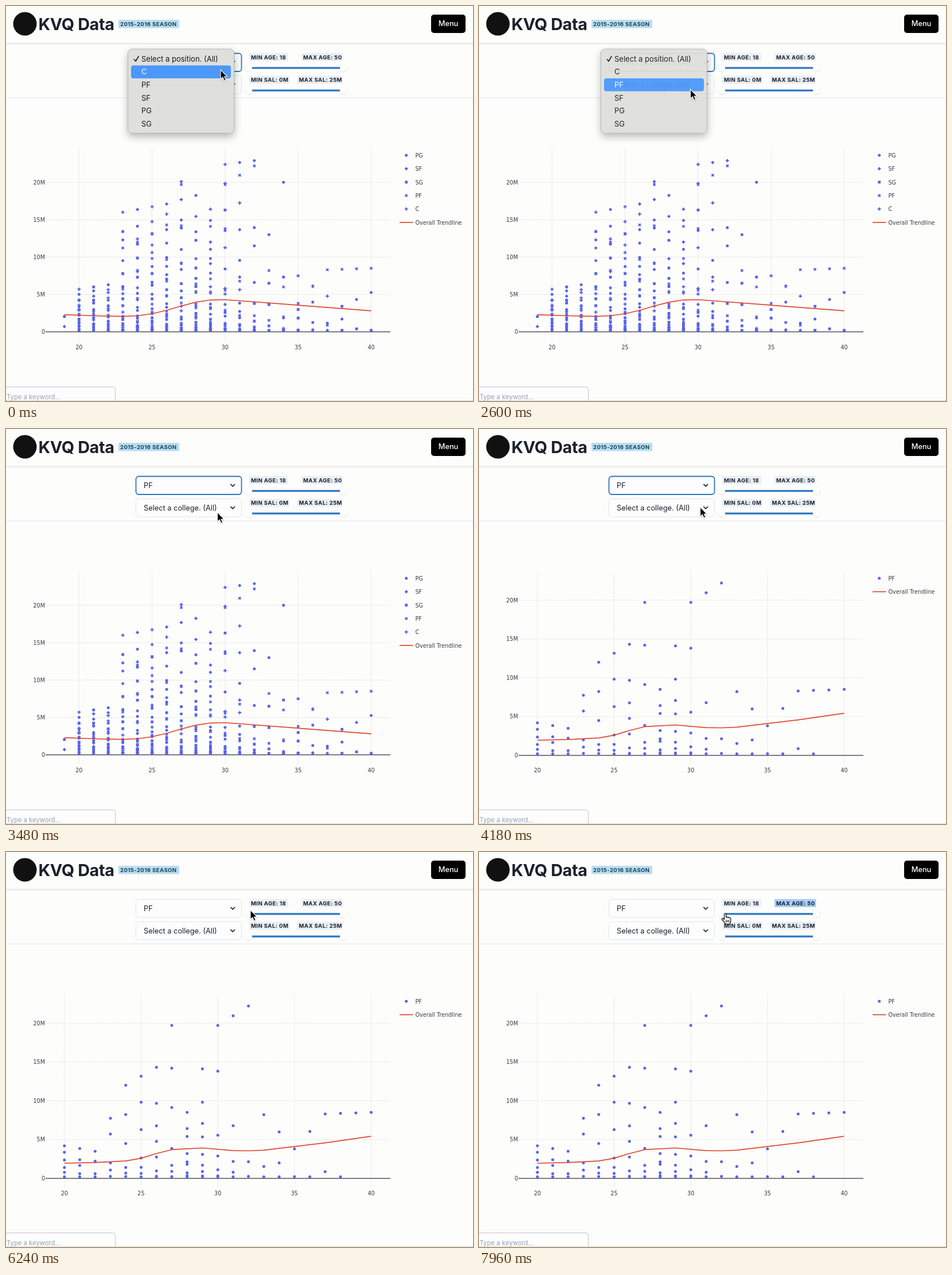
Write an HTML page that moves like this. It is 814 px wide and 688 px high and loops after 8000 ms.

```html
<!DOCTYPE html>
<html lang="en">
<head>
<meta charset="utf-8">
<title>Season salaries</title>
<style>
  html, body { margin: 0; width: 100%; height: 100%; overflow: hidden; background: #fdfdfc; }
  svg { display: block; width: 814px; height: 688px; font: 12.8px Inter, sans-serif; fill: #1a202c; }
  .badge { font-size: 9.6px; font-weight: 700; letter-spacing: .4px; }
  .chart { font: 9.6px "DejaVu Sans", sans-serif; fill: #363a42; }
  .mark { fill: #5663ec; }
  .trend { fill: none; stroke: #df452e; stroke-width: 1.7; stroke-linejoin: round; }
  .grid { stroke: #e5e5ea; stroke-width: 1; stroke-dasharray: 2 .6; }
  .chevron { fill: none; stroke: #1a202c; stroke-width: 1.7; stroke-linecap: round; stroke-linejoin: round; }
  .box { fill: #fdfdfd; stroke: #dfe4ed; }
  .box.focused { stroke: #2c76bf; stroke-width: 1.8; }
  .menu { font-size: 13px; }
</style>
</head>
<body>
<svg viewBox="0 0 814 688">
  <defs>
    <filter id="menuShadow" x="-20%" y="-20%" width="140%" height="150%">
      <feDropShadow dx="0" dy="6" stdDeviation="7" flood-opacity=".27"/>
    </filter>
    <filter id="thumbShadow" x="-50%" y="-50%" width="200%" height="200%">
      <feDropShadow dx="0" dy=".8" stdDeviation="1" flood-opacity=".16"/>
    </filter>
    <filter id="cursorShadow" x="-50%" y="-50%" width="200%" height="200%">
      <feDropShadow dx="0" dy="1" stdDeviation="1" flood-opacity=".3"/>
    </filter>
  </defs>

  <circle cx="33" cy="31" r="20.5" fill="#111"/>
  <text x="188.5" y="42" text-anchor="end" font-size="28.8" font-weight="700" letter-spacing="-.4">KVQ Data</text>
  <rect x="196" y="24" width="106" height="14.5" rx="1.5" fill="#b9def0"/>
  <text x="199" y="34.8" class="badge" fill="#1d4059">2015-2016 SEASON</text>
  <rect x="741" y="15" width="60" height="32" rx="5" fill="#000"/>
  <text x="771" y="35.4" text-anchor="middle" fill="#fff" font-weight="500">Menu</text>
  <path d="M0 65.5H814" stroke="#e5e5e9" stroke-width="2"/>
  <path d="M0 160H814" stroke="#dfe5f1"/>

  <rect id="positionBox" class="box" x="226.5" y="82.5" width="184" height="31.5" rx="5"/>
  <text id="positionText" x="240" y="102.5"></text>
  <rect class="box" x="226.5" y="121.5" width="184" height="31.5" rx="5"/>
  <text x="240" y="141.5">Select a college. (All)</text>
  <path class="chevron" d="M391.8 96.5l3.4 3.4 3.4-3.4M391.8 135.5l3.4 3.4 3.4-3.4"/>
  <g id="sliders"></g>

  <g id="allChart"></g>
  <g id="forwardChart"></g>

  <rect x="-4" y="663.5" width="194.5" height="40" rx="4" fill="#fdfdfd" stroke="#bfc4d4"/>
  <text x="1" y="685" font-size="11.2" letter-spacing=".05" fill="#99a0b3">Type a keyword...</text>
  <path d="M0 687.5H814" stroke="#d5d6dc"/>

  <g id="menu" class="menu"></g>

  <path id="arrow" filter="url(#cursorShadow)" stroke="#fff" stroke-width="1.1"
    d="M0 0V16.4L3.7 13 6.6 19 9.3 17.8 6.6 12H11.6Z" fill="#000"/>
  <path id="hand" filter="url(#cursorShadow)" fill="#fff" stroke="#000" stroke-width="1.1" stroke-linejoin="round"
    d="M0 1.5C0-.6 3-.6 3 1.5V7C3 5.6 6 5.6 6 7.4 6 6.2 8.7 6.4 8.7 8 9 7 11.2 7.3 11.2 9V12.5C11.2 14.5 10 15.5 9.8 18.5H2.2C1.6 15.6-1.5 13.6-3.8 10.6-5 8.8-2.8 7.8-1.5 9.2L0 10.8ZM3.2 11.5V15.5M5.6 11.5V15.5M8 11.5V15.5"/>
</svg>

<script>
const $ = id => document.getElementById(id);
const PERIOD = 8000;
const DEFAULT_POSITION = 'Select a position. (All)';

const clamp = v => Math.min(1, Math.max(0, v));
const linear = u => u;
const smooth = u => u * u * (3 - 2 * u);

// Value of one column of the key rows at the given place in the first column.
function interpolate(keys, at, ease = linear, column = 1) {
  const i = Math.max(1, keys.findIndex(key => key[0] >= at));
  const from = keys[i - 1], to = keys[i];
  const u = ease((at - from[0]) / (to[0] - from[0]));
  return from[column] + (to[column] - from[column]) * u;
}

let seed = 41;
const random = () => (seed = seed * 16807 % 2147483647) / 2147483647;

// Every age has a number of players and a highest salary (millions);
// the higher the top, the more the other salaries crowd near zero.
function makePlayers(counts, tops, positions) {
  const players = [];
  for (let age = counts[0][0]; age <= 40; age++) {
    const count = Math.round(interpolate(counts, age));
    const top = interpolate(tops, age);
    for (let k = 1; k <= count; k++) {
      const rank = k === count ? 1 : clamp((k - 1 + .8 * (random() - .5)) / (count - 1));
      const pay = .2 + (top - .2) * rank ** (1.2 + top / 13);
      players.push({ age, pay, symbol: positions[Math.floor(random() * positions.length)] });
    }
  }
  return players;
}

const forwards = makePlayers(
  [[20, 6], [22, 4], [26, 8], [29, 9], [32, 3], [36, 2], [40, 1]],
  [[20, 4.2], [22, 3.5], [24, 12], [26, 14.3], [27, 19.7], [28, 8.5], [30, 19.7], [32, 22.2], [33, 8.2], [35, 3.8], [37, 8.3], [40, 8.5]],
  ['PF']);
const others = makePlayers(
  [[19, 2], [20, 14], [25, 24], [27, 22], [30, 18], [33, 5], [40, 2]],
  [[19, 2.05], [20, 5.7], [22, 6.3], [23, 16], [26, 17.1], [27, 20.1], [29, 16.4], [30, 22.4], [32, 22.9], [33, 13], [34, 20], [35, 7.5], [38, 3.4], [40, 5.25]],
  ['PG', 'SF', 'SG', 'C']);
const allTrend = [[19, 2.3], [21, 2.15], [23, 2.07], [24, 2.15], [25, 2.42], [26, 2.88], [27, 3.46], [28, 3.96], [29, 4.26], [30, 4.3], [40, 2.82]];
const forwardTrend = [[20, 1.96], [22, 2.04], [24, 2.25], [25, 2.6], [26, 3.2], [27, 3.7], [29, 3.92], [31, 3.58], [32, 3.55], [33, 3.63], [37, 4.58], [40, 5.43]];

// Each symbol is a clockwise path around the current point.
const symbols = {
  PG: 'm-2.5 0a2.5 2.5 0 1 1 5 0a2.5 2.5 0 1 1-5 0z',
  SF: 'm0-3.1l3.1 3.1-3.1 3.1-3.1-3.1z',
  SG: 'm-2.4-2.4h4.8v4.8h-4.8z',
  PF: 'm-1.3-2.7l1.3 1.3 1.3-1.3 1.4 1.4-1.3 1.3 1.3 1.3-1.4 1.4-1.3-1.3-1.3 1.3-1.4-1.4 1.3-1.3-1.3-1.3z',
  C: 'm-1-2.9h2v1.9h1.9v2h-1.9v1.9h-2v-1.9h-1.9v-2h1.9z'
};
const mark = (x, y, symbol) => `M${x.toFixed(1)} ${y.toFixed(1)}${symbols[symbol]}`;

function drawChart({ zeroY, perMillion, players, trend, legend }) {
  const left = 101.8, right = 636.5, firstAge = trend[0][0];
  const x = age => left + (age - firstAge) * (right - left) / (40 - firstAge);
  const y = pay => zeroY - pay * perMillion;
  let svg = '';
  for (let age = 20; age <= 40; age += 5)
    svg += `<path class="grid" d="M${x(age)} 248V584"/><text x="${x(age)}" y="597.7" text-anchor="middle">${age}</text>`;
  for (let pay = 0; pay <= 20; pay += 5) {
    if (pay) svg += `<path class="grid" d="M69 ${y(pay)}H670"/>`;
    svg += `<text x="68" y="${y(pay) + 3.6}" text-anchor="end">${pay ? pay + 'M' : 0}</text>`;
  }
  svg += `<path d="M69 ${zeroY}H670" stroke="#505158" stroke-width="1.3"/>`;
  svg += `<path class="mark" d="${players.map(p => mark(x(p.age), y(p.pay), p.symbol)).join('')}"/>`;
  svg += `<polyline class="trend" points="${trend.map(([age, pay]) => [x(age), y(pay)]).join(' ')}"/>`;
  legend.forEach(([label, symbol], i) => {
    const row = 260 + 23.4 * i;
    svg += symbol ? `<path class="mark" d="${mark(697.7, row, symbol)}"/>` : `<path class="trend" d="M686 ${row}h23.5"/>`;
    svg += `<text x="713.5" y="${row + 3.7}">${label}</text>`;
  });
  return `<g class="chart">${svg}</g>`;
}

const trendLegend = ['Overall Trendline'];
$('allChart').innerHTML = drawChart({
  zeroY: 567.5, perMillion: 13.02, players: [...forwards, ...others], trend: allTrend,
  legend: [...['PG', 'SF', 'SG', 'PF', 'C'].map(p => [p, p]), trendLegend]
});
$('forwardChart').innerHTML = drawChart({
  zeroY: 568.5, perMillion: 13.525, players: forwards.map(p => ({ ...p, symbol: 'PG' })), trend: forwardTrend,
  legend: [['PF', 'PG'], trendLegend]
});

const badge = (x, y, width, label, id = '') =>
  `<rect ${id && `id="${id}"`} x="${x}" y="${y}" width="${width}" height="14" rx="1.5" fill="#e9eef4"/>
   <text class="badge" x="${x + 3}" y="${y + 10.5}">${label}</text>`;
const slider = y =>
  `<path d="M429 ${y}H582" stroke="#2c76c4" stroke-width="3.3"/>
   <g fill="#fff" filter="url(#thumbShadow)"><circle cx="423.5" cy="${y}" r="5.7"/><circle cx="588" cy="${y}" r="5.7"/></g>`;
$('sliders').innerHTML = slider(107.9) + slider(147.2) +
  badge(424, 82, 67.5, 'MIN AGE: 18') + badge(515, 82, 72.5, 'MAX AGE: 50', 'maxAge') +
  badge(424, 121.5, 70, 'MIN SAL: 0M') + badge(507.5, 121.5, 79.5, 'MAX SAL: 25M');

const ROW = 22.6;
$('menu').innerHTML =
  `<rect x="212.5" y="75" width="185" height="146.5" rx="7" fill="#dfdfdc" stroke="#b4b4b4" filter="url(#menuShadow)"/>
   <rect id="highlight" x="218" width="174" height="22.5" rx="4" fill="#4b98fb"/>
   <path class="chevron" d="M223.4 93l2.6 3.2 5-8.4"/>` +
  [DEFAULT_POSITION, 'C', 'PF', 'SF', 'PG', 'SG'].map((label, i) =>
    `<text class="option" x="236" y="${96.7 + ROW * i}">${label}</text>`).join('');
const options = document.querySelectorAll('.option');

// Time, x, y
const cursorPath = [[0, 374, 111], [300, 374, 111], [1100, 368.5, 145], [3900, 368.5, 145], [4700, 429, 113.5],
  [5400, 429, 113.5], [5800, 426, 101], [6500, 426, 101], [7100, 427.5, 107], [PERIOD, 427.5, 107]];

const show = (id, visible) => $(id).setAttribute('display', visible ? 'inline' : 'none');

function render() {
  const t = performance.now() % PERIOD;
  const x = interpolate(cursorPath, t, smooth, 1);
  const y = interpolate(cursorPath, t, smooth, 2);
  const overSlider = t >= 6900;
  show('arrow', !overSlider);
  show('hand', overSlider);
  for (const id of ['arrow', 'hand']) $(id).setAttribute('transform', `translate(${x} ${y})`);

  const selected = y > 126 ? 2 : 1;
  $('highlight').setAttribute('y', 80.9 + ROW * selected);
  options.forEach((option, i) => option.setAttribute('fill', i === selected ? '#fff' : '#1a1a1c'));
  $('menu').setAttribute('opacity', 1 - clamp((t - 2590) / 220));
  show('menu', t < 2810);

  $('positionBox').classList.toggle('focused', t < 5900);
  $('positionText').textContent = t < 2680 ? DEFAULT_POSITION : 'PF';
  $('maxAge').setAttribute('fill', t < 6900 ? '#e9eef4' : '#a5cdf4');

  const filtered = t >= 3720;
  show('allChart', !filtered);
  show('forwardChart', filtered);
  requestAnimationFrame(render);
}
render();
</script>
</body>
</html>
```
